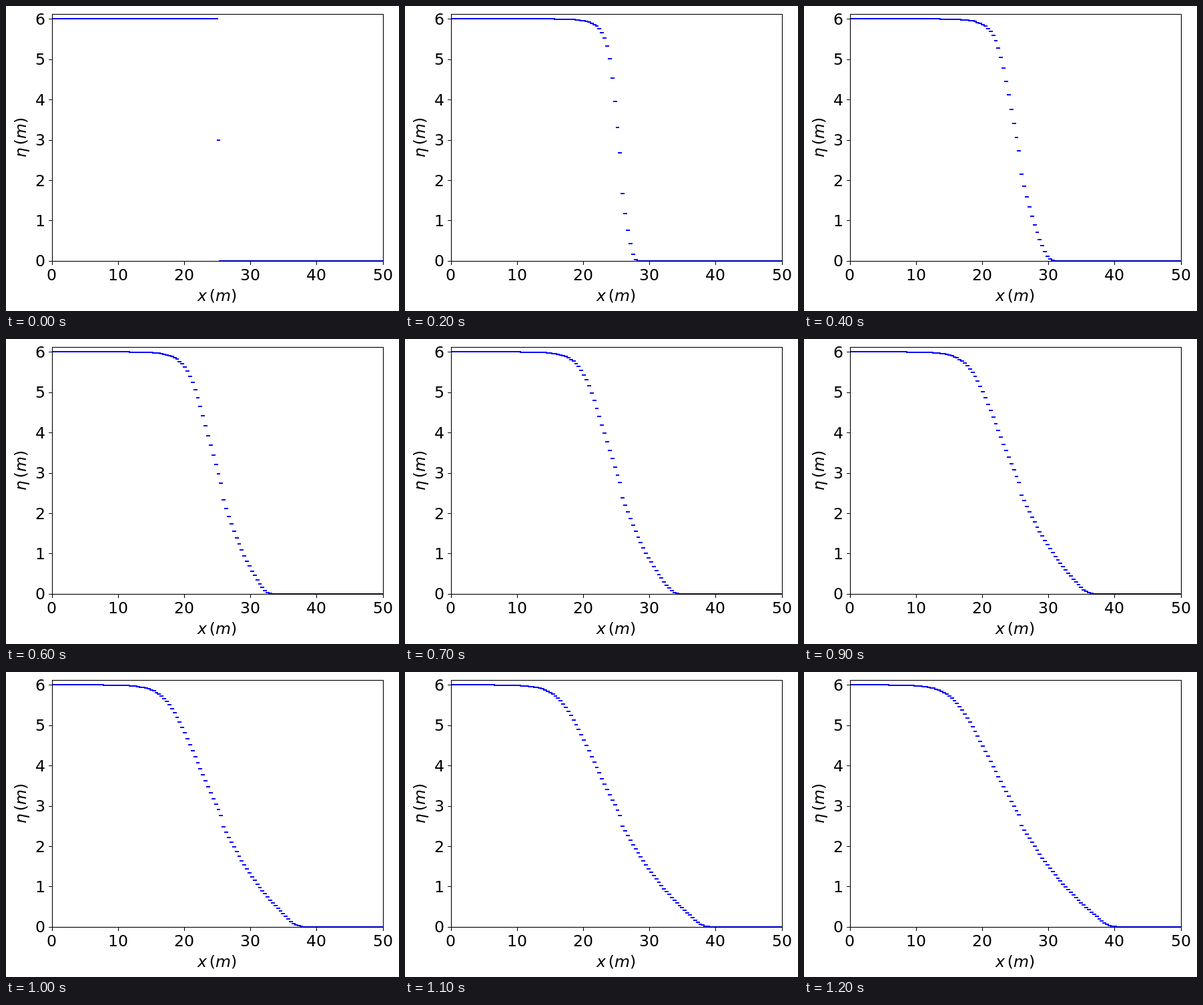
An HTML page that plays this animation: 589 by 457 pixels, repeating every 1.3 s.

```html
<!DOCTYPE html>
<html lang="en">
<head>
<meta charset="utf-8">
<title>Dam break</title>
<style>
  html, body { margin: 0; width: 100%; height: 100%; overflow: hidden; background: #fff; }
  svg { display: block; }
  text { font: 23.6px "DejaVu Sans", sans-serif; }
  .name { text-anchor: middle; }
  .it { font-style: oblique; }
  .axis { fill: none; stroke: #000; stroke-width: 1.11; }
  #cells { fill: none; stroke: #00f; stroke-width: 2; stroke-linecap: square; }
</style>
</head>
<body>
<svg width="589" height="457" viewBox="0 0 589 457">
  <clipPath id="plot"><rect x="69" y="12" width="497" height="371"/></clipPath>
  <g clip-path="url(#plot)"><path id="cells"/></g>
  <rect class="axis" x="69.5" y="12.5" width="496" height="370"/>
  <path class="axis" id="ticks"/>
  <g id="labels"></g>
  <text class="name" x="316.6" y="442"><tspan class="it">x</tspan><tspan dx=".167em">(</tspan><tspan class="it">m</tspan>)</text>
  <text class="name" transform="translate(30 197) rotate(-90)"><tspan class="it">η</tspan><tspan dx=".167em">(</tspan><tspan class="it">m</tspan>)</text>
</svg>
<script>
// Plot geometry in pixels
const LEFT = 68.6, BASE = 381.75, WIDTH = 496, METRE = 60.4, DIGIT = 15;
const CELLS = 128, PITCH = WIDTH / CELLS;
// Water: depth behind the dam, gravity, cell size, dam position in cells
const DEPTH = 6, G = 9.81, DX = 50 / CELLS, DAM = 64.5;
const STEPS = 13, STEP_MS = 100;

const $ = id => document.getElementById(id);
const yOf = h => Math.round(BASE - METRE * h);
const celerity = h => Math.sqrt(G * h);

// Ideal dam break on a dry bed: the cell that depth h has reached at time t
const ideal = (h, t) => DAM + (2 * celerity(DEPTH) - 3 * celerity(h)) * t / DX;

// Numerical diffusion gives the upstream side a long shallow tail...
function upstream(h, t) {
  const drop = DEPTH - h;
  const tail = (3.8 + t) * Math.log(1 + .5 / drop);
  const lag = (.86 + 1.07 * t) * (1 - Math.exp(-drop / (.2 + .42 * t)));
  return ideal(h, t) - tail + lag;
}

// ...and holds back the thin front downstream.
function downstream(h, t) {
  const drag = 5.9 * t ** 1.5 * Math.exp(-h / .2);
  return ideal(h, t) - drag - .2 + .25 * t;
}

function depthAt(cell, t) {
  if (t === 0) return DEPTH * (1 - Math.sign(cell - DAM + .5)) / 2;
  const reach = cell < DAM + 1 ? upstream : downstream;
  let low = 0, high = DEPTH;
  for (let n = 0; n < 30; n++) {
    const mid = (low + high) / 2;
    if (reach(mid, t) > cell) low = mid; else high = mid;
  }
  return low;
}

function cellPath(t) {
  let d = "";
  for (let i = 0; i < CELLS; i++) {
    const x = LEFT + i * PITCH;
    d += `M${Math.round(x)} ${yOf(depthAt(i, t))}H${Math.round(x + PITCH)}`;
  }
  return d;
}

function drawAxes() {
  let ticks = "", labels = "";
  const label = (value, x, y) => labels += `<text x="${Math.round(x)}" y="${y}">${value}</text>`;
  for (let m = 0; m <= 50; m += 10) {
    const x = LEFT + m * WIDTH / 50;
    ticks += `M${Math.round(x) + .5} 383v4.9`;
    label(m, x - DIGIT * String(m).length / 2, 411);
  }
  for (let m = 0; m <= DEPTH; m++) {
    ticks += `M69 ${yOf(m) + .5}h-4.9`;
    label(m, LEFT - 9.7 - DIGIT, Math.round(BASE - METRE * m + 8.6));
  }
  $("ticks").setAttribute("d", ticks);
  $("labels").innerHTML = labels;
}

const paths = Array.from({ length: STEPS }, (_, step) => cellPath(step / 10));
let shown = -1;

function tick() {
  const step = Math.floor(performance.now() / STEP_MS) % STEPS;
  if (step !== shown) $("cells").setAttribute("d", paths[step]);
  shown = step;
  requestAnimationFrame(tick);
}

drawAxes();
tick();
</script>
</body>
</html>
```
